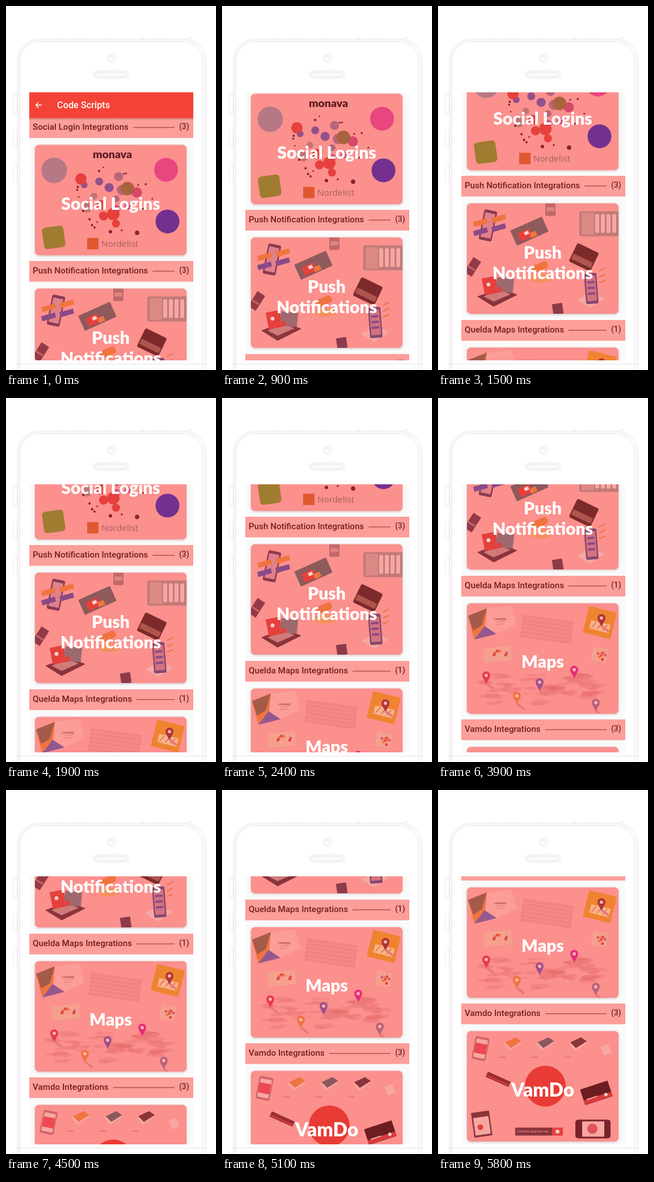
Animation, 370 px wide and 641 px high, one loop 5900 ms. Source, as an HTML page with a canvas:

```html
<!DOCTYPE html>
<html lang="en">
<head>
<meta charset="utf-8">
<title>Code Scripts</title>
<style>
html, body { margin: 0; width: 100%; height: 100%; overflow: hidden; background: #fff; }
canvas { display: block; }
</style>
</head>
<body>
<canvas id="stage" width="370" height="641"></canvas>
<script>
const W = 370, H = 641, PAGE_H = 1210;
const STEP = 100, LOOP = 5900, SPEED = 10;
const VIEW = { x: 41, y: 152, w: 289, h: 472 };
const FIRST = 196, PITCH = 253.4;
const CARD = '#fb908d', HEADER = '#fc9e99', DARK = '#74201f';
const MAROON = '#8a343c', RED = '#e5403c', ORANGE = '#f0743f', VIOLET = '#8a4a88', PALE = '#f7a7a2';

function layer(h) {
  const c = document.createElement('canvas');
  c.width = W;
  c.height = h;
  return c;
}

const page = layer(PAGE_H), phone = layer(H);
let g = page.getContext('2d');

let seed = 7;
function rand(a, b) {
  seed = (seed * 16807) % 2147483647;
  return a + (b - a) * seed / 2147483647;
}

function poly(color, ...pts) {
  g.fillStyle = color;
  g.beginPath();
  for (let i = 0; i < pts.length; i += 2) g.lineTo(pts[i], pts[i + 1]);
  g.fill();
}

function rect(color, x, y, w, h, r = 0) {
  g.fillStyle = color;
  g.beginPath();
  g.roundRect(x, y, w, h, r);
  g.fill();
}

function dot(color, x, y, r, flat = 1) {
  g.fillStyle = color;
  g.beginPath();
  g.ellipse(x, y, r, r * flat, 0, 0, Math.PI * 2);
  g.fill();
}

function line(color, x1, y1, x2, y2, width = 1) {
  g.strokeStyle = color;
  g.lineWidth = width;
  g.beginPath();
  g.moveTo(x1, y1);
  g.lineTo(x2, y2);
  g.stroke();
}

// Runs draw around a turned origin.
function at(x, y, angle, draw) {
  g.save();
  g.translate(x, y);
  g.rotate(angle);
  draw();
  g.restore();
}

// A box given by its centre in the current frame.
function box(color, w, h, x = 0, y = 0, r = 1) {
  rect(color, x - w / 2, y - h / 2, w, h, r);
}

function times(n, draw) {
  for (let i = 0; i < n; i++) draw(i);
}

function text(str, x, y, font, color, align = 'left') {
  g.font = font;
  g.fillStyle = color;
  g.textAlign = align;
  g.fillText(str, x, y);
}

function title(str, y, size = 30.1) {
  text(str, 184.5, y, `900 ${size}px Lato, sans-serif`, '#fff', 'center');
}

function header(top, label, count) {
  rect(HEADER, 41, top, 289, 36.5);
  text(label, 47, top + 22, '500 15.2px Roboto, sans-serif', DARK);
  const x = 55 + g.measureText(label).width;
  line('#8a302e', x, top + 18, 297, top + 18, 1.2);
  text(`(${count})`, 305, top + 21, '500 13.8px Roboto, sans-serif', DARK);
}

// Draws a clipped card; art uses y measured from the card's top.
function card(top, art) {
  g.save();
  g.translate(0, top);
  g.shadowColor = 'rgba(90,40,40,.3)';
  g.shadowBlur = 4;
  g.shadowOffsetY = 1;
  rect(CARD, 51, 0, 267, 194.5, 7);
  g.shadowColor = 'transparent';
  g.clip();
  art();
  g.restore();
}

function appBar() {
  rect('#f44336', 41, 152, 289, 45);
  const shade = g.createLinearGradient(0, 197, 0, 201);
  shade.addColorStop(0, 'rgba(150,40,35,.4)');
  shade.addColorStop(1, 'rgba(150,40,35,0)');
  rect(shade, 41, 197, 289, 4);
  line('#fff', 53, 174.5, 63, 174.5, 1.5);
  for (const dy of [-5, 5]) line('#fff', 52.5, 174.5, 57.5, 174.5 + dy, 1.5);
  text('Code Scripts', 90, 180, '500 16.3px Roboto, sans-serif', '#fff');
}

function socialArt() {
  const hues = ['#b9657c', RED, '#94508a', '#d6486a', '#c47474'];
  times(14, i => {
    const a = i * 2.4, d = 14 + i * 2.9;
    dot(hues[i % 5], 180 + d * Math.cos(a), 95 + d * Math.sin(a), 6 + i * 3 % 4);
  });
  times(18, () => {
    const a = rand(0, 6.3), d = rand(45, 62);
    dot('#842632', 188 + d * 1.15 * Math.cos(a), 95 + d * Math.sin(a), rand(1.2, 2.2));
  });
  dot('#842632', 184, 153, 3);
  dot('#842632', 231, 155, 3.8);
  dot(RED, 132, 60, 10);
  dot('#a9633d', 214, 77, 12);
  dot(RED, 189, 122, 11);
  dot('#b77885', 85, 45, 22.5);
  dot('#e8467e', 282, 44, 21);
  dot('#74308f', 284.5, 135, 21);
  at(84, 163, -0.14, () => box('#a07c30', 38, 38, 0, 0, 6));
  rect('#e0582f', 143, 164, 20, 20);
  text('Nordelist', 168, 180, '15.3px "Open Sans", sans-serif', '#a4605d');
  text('monava', 187.5, 24, '900 19.5px Lato, sans-serif', '#5e1b20', 'center');
  title('Social Logins', 115);
}

function pushArt() {
  // phone with message ribbons
  at(88, 39, 0.2, () => {
    box('#8a3a50', 23, 54, 0, 0, 3);
    box('#e0808a', 18, 44);
  });
  times(4, i => {
    const side = i % 2, row = i >> 1;
    at(75 + 32 * side, 34 - 7 * side + 16 * row, -0.28, () => box(row ? VIOLET : ORANGE, 25, 9));
  });
  // envelope
  at(161, 49, -0.42, () => {
    box('#8e5a5c', 61, 29);
    box(RED, 22, 16, -10, 3);
    box('#fbd0c8', 8, 6, -6, 1);
    box(ORANGE, 12, 9, 4, 8);
  });
  rect('#c0686b', 189, 0, 18, 22, 2);
  rect('#e08280', 191, 7, 14, 7);
  // wide device
  rect('#c27a78', 249, 14, 70, 44, 3);
  rect('#dc8986', 253, 17, 22, 38);
  times(4, i => rect(PALE, 277 + i * 10, 19, 7, 33, 2));
  // wallets
  at(257, 95, 0.45, () => {
    box('#7d2a2c', 42, 36, 0, 0, 3);
    box('#b0554d', 38, 10, 0, 7);
  });
  at(61, 112, 0.57, () => {
    box('#943a46', 16, 31);
    box('#c8666c', 14, 3, 0, 3);
  });
  // laptop
  poly(MAROON, 69, 164, 110, 149, 140, 161, 98, 182);
  poly('#d07a7a', 80, 164, 110, 153, 128, 160, 98, 173);
  at(92, 145, -0.2, () => box(RED, 25, 30));
  at(118, 144, 0.1, () => box('#9d696e', 30, 25));
  dot('#fbcac6', 89, 143, 3.5);
  dot(RED, 108, 152, 5);
  // hands
  at(180, 112, -0.4, () => box(ORANGE, 28, 13, 0, 0, 5));
  dot('#f5905f', 181, 132, 20, 0.4);
  // standing phone on its plate
  poly(PALE, 245, 170, 270, 157, 294, 167, 268, 184);
  at(270, 150, -0.08, () => {
    box('#85486f', 22, 54, 0, 0, 3);
    box('#d4727e', 17, 44);
    times(3, i => box(VIOLET, 13, 4, 0, -11 + i * 10));
  });
  times(3, i => line(ORANGE, 284, 120 + i * 10, 294, 114 + i * 11, 2.2));
  at(211, 186, -0.15, () => box('#8c3b4a', 18, 19));
  title('Push', 98);
  title('Notifications', 134);
}

function pin(color, x, y) {
  line('#e87a78', x, y + 14, x + 13, y + 24, 4);
  dot(color, x, y, 7);
  poly(color, x - 6.4, y + 3, x + 6.4, y + 3, x, y + 15);
  dot('#fbb0a8', x, y, 3);
}

function smallMap(x, y, w, angle) {
  at(x, y, angle, () => {
    box('#f5a08d', w, 25);
    times(7, i => dot([RED, ORANGE, '#d6587a'][i % 3], rand(-0.4, 0.4) * w, rand(-9, 9), 2.5));
  });
}

function mapsArt() {
  // folded sheet
  poly('#fc9d98', 86, 9, 130, 4, 138, 38, 103, 54, 82, 40);
  poly(ORANGE, 53, 22, 86, 9, 83, 39, 64, 64);
  poly('#a55b49', 53, 22, 86, 9, 77, 39, 62, 48);
  poly('#95588e', 64, 64, 82, 40, 103, 54);
  text('Location', 99, 30, 'bold 5.5px Roboto, sans-serif', '#a44e4c');
  times(2, i => line('#de7773', 102 + i, 34 + i * 4, 119 - i * 3, 31 + i * 5));
  // ruled sheet
  at(192, 46, 0.14, () => {
    box('#f28482', 90, 40);
    times(5, i => line('#f89793', -42, -14 + i * 7, 42, -14 + i * 7));
  });
  // tile with pin
  at(285, 34, 0.24, () => {
    box('#f0832f', 50, 48);
    box('#f9b28c', 35, 15, 2, 7);
    times(3, i => line('#d96a4a', -12 + i * 10, 12, -6 + i * 10, 1, 1.5));
  });
  pin('#ae343b', 288, 26);
  smallMap(105, 90, 49, -0.1);
  smallMap(285, 91, 27, 0.22);
  // hazy continents
  times(70, i => {
    const x = rand(80, 285), y = 150 + 28 * Math.sin(x / 22) * rand(-1, 1);
    dot('rgba(225,105,105,.3)', x, y, rand(6, 18), 0.25);
  });
  pin('#e63a4a', 85, 127);
  pin(ORANGE, 139, 163);
  pin('#9d4e8e', 179, 139);
  pin('#e62c7d', 240, 117);
  pin('#b9627e', 278, 175);
  title('Maps', 114);
}

function adsArt() {
  at(75, 31, 0.2, () => {
    box('#d4646c', 25, 41, 0, 0, 3);
    box(PALE, 20, 33);
    box('#ee4850', 20, 18);
  });
  // row of lying phones with captions
  [ORANGE, '#8c585c', MAROON].forEach((color, i) => {
    const x = 132 + i * 57.5;
    poly(PALE, x - 16, 22, x + 5, 12, x + 15, 21, x - 6, 35);
    poly(color, x - 14, 20, x + 5, 11, x + 15, 18, x - 4, 30);
    rect('#c56866', x - 24, 45.5, 11, 1.3);
  });
  at(296, 33, -0.4, () => box(PALE, 14, 17));
  at(106, 85, 0.42, () => {
    box('#982f34', 44, 10);
    box(RED, 42, 2, 0, 2);
  });
  dot('#e83b35', 189, 97, 36);
  // bank card
  at(279, 109, -0.32, () => {
    box('#6b1d22', 51, 29);
    box('#d93c3b', 51, 8, 0, 10);
    box('#f3a8a0', 20, 2, -10, 6);
    dot('#fbd0c8', 15, 8, 3);
  });
  // framed picture
  at(77, 164, -0.14, () => {
    box(MAROON, 32, 44);
    box(PALE, 27, 31, 0, 3);
    dot(RED, -3, 5, 5);
  });
  rect(MAROON, 136, 170, 65, 14);
  rect(RED, 201, 170, 19, 14);
  text('Install this application now', 140, 178.5, '4.6px Roboto, sans-serif', '#eba09c');
  dot('#fbc8c2', 210.5, 177, 3.5);
  // wide phone
  rect('#7a2229', 242, 156, 62, 33, 5);
  rect(PALE, 254, 159, 39, 27);
  dot('#e0525a', 272, 172, 9);
  title('VamDo', 116, 33.5);
}

const sections = [
  ['Social Login Integrations', 3, socialArt],
  ['Push Notification Integrations', 3, pushArt],
  ['Quelda Maps Integrations', 1, mapsArt],
  ['Vamdo Integrations', 3, adsArt]
];

function drawPage() {
  rect('#fafafa', 0, 0, W, PAGE_H);
  sections.forEach(([label, count, art], i) => {
    const top = Math.round(FIRST + PITCH * i);
    header(top, label, count);
    card(top + 48.4, art);
  });
  appBar();
}

function drawPhone() {
  const ring = (color, x, y, w, h, r) => {
    g.strokeStyle = color;
    g.beginPath();
    g.roundRect(x + 0.5, y + 0.5, w, h, r);
    g.stroke();
  };
  g = phone.getContext('2d');
  rect('#fff', 0, 0, W, H);
  g.setLineDash([2, 1]);
  times(3, i => ring(i === 1 ? '#ececec' : '#d6d6d6', 20 + i * 2, 58 + i * 2, 332 - i * 5, 640, 38 - i * 2));
  times(2, i => {
    ring('#cfcfcf', 154 + i * 3, 114 + i * 3, 61 - i * 6, 12 - i * 6, 6 - i * 3);
    ring('#cfcfcf', 178 + i * 3, 85 + i * 3, 14 - i * 6, 14 - i * 6, 7 - i * 3);
  });
  for (const [y, h] of [[153, 37], [219, 30], [278, 30]]) ring('#dedede', 12, y, 7, h, 1);
  for (const x of [238, 322]) line('#d6d6d6', x, 56.5, x + 5, 56.5);
  line('#d6d6d6', 18, 630.5, 353, 630.5);
}

const ctx = document.getElementById('stage').getContext('2d');
const start = performance.now();

function frame() {
  const t = Math.max(0, performance.now() - start) % LOOP;
  const scroll = Math.floor(t / STEP) * SPEED;
  const { x, y, w, h } = VIEW;
  ctx.drawImage(phone, 0, 0);
  ctx.drawImage(page, x, y + scroll, w, h, x, y, w, h);
  requestAnimationFrame(frame);
}

drawPage();
drawPhone();
frame();
</script>
</body>
</html>
```
